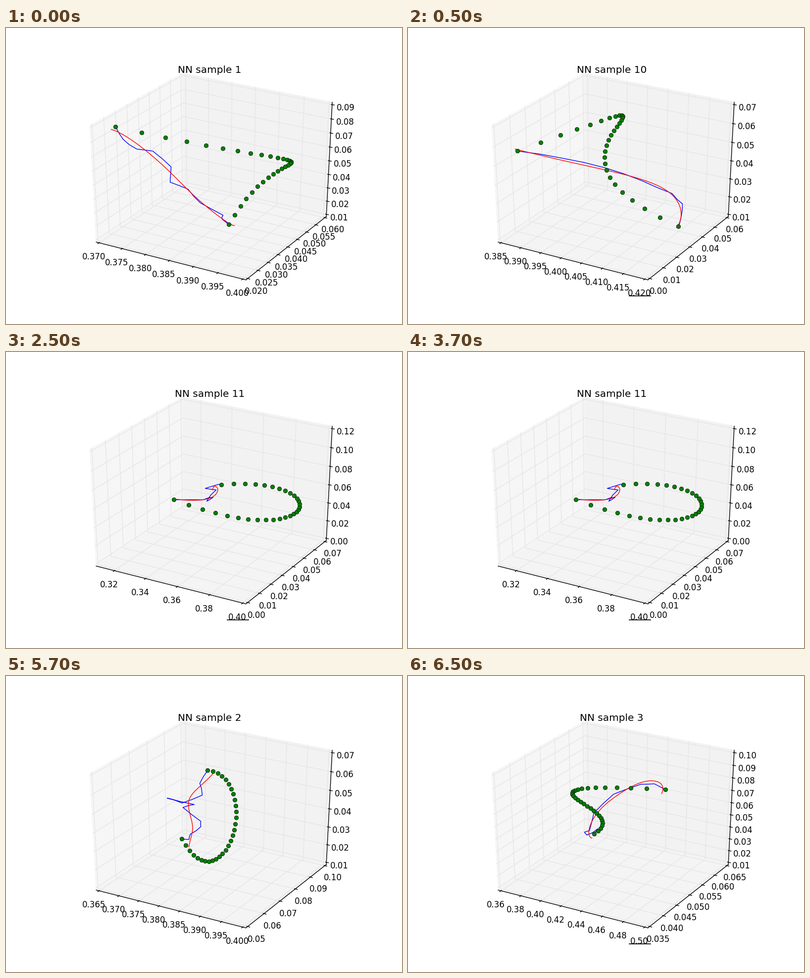
These frames come from a looping animation (800x600 px, 8 s). A matplotlib script:

```python
import numpy as np
import matplotlib.pyplot as plt
from matplotlib.animation import FuncAnimation

plt.rcParams["font.family"] = "DejaVu Sans"

INTERVAL = 500
LO, HI = -1 / 48, 1 + 1 / 48  # panes reach slightly past the axis limits
DOT_COUNT = 30

fig = plt.figure(figsize=(8, 6), dpi=100, facecolor="white")
ax = fig.add_axes([0, 0, 1, 1])


def project(x, y, z):
    """Unit-cube point to stage pixels (elevation 30, azimuth -60, distance 10)."""
    rel = np.array([x, y, z], float) - 0.5
    elev, azim = np.radians(30), np.radians(-60)
    ce, se, ca, sa = np.cos(elev), np.sin(elev), np.cos(azim), np.sin(azim)
    depth = 10 - rel @ [ce * ca, ce * sa, se]
    right = rel @ [-sa, ca, 0] / depth
    up = rel @ [-se * ca, -se * sa, ce] / depth
    return 100 + (right + 0.095) / 0.185 * 620, 540 - (up + 0.095) / 0.185 * 480


def spline(points, knots, samples):
    """Not-a-knot cubic through the points, one per knot."""
    def basis(t):
        bends = [np.maximum(t - k, 0) ** 3 for k in knots[2:-2]]
        return np.stack([t**0, t, t**2, t**3] + bends, axis=1)

    weights = np.linalg.solve(basis(knots), np.array(points, float))
    return basis(np.linspace(0, knots[-1], samples)) @ weights


def dot_path(points):
    """Key points sit at every fifth dot and at the last one."""
    knots = np.minimum(np.arange(len(points)) * 5.0, DOT_COUNT - 1)
    return spline(points, knots, DOT_COUNT)


def smooth_path(points):
    return spline(points, np.arange(len(points), dtype=float), 90) + 0.5


def rough_path(points, seed):
    """Polyline through the points with a slightly displaced middle in each leg."""
    keys = np.array(points, float)
    rng = np.random.default_rng(seed)
    path = np.empty((2 * len(keys) - 1, 2))
    path[::2] = keys
    path[1::2] = (keys[1:] + keys[:-1]) / 2 + rng.uniform(-1.5, 1.5, (len(keys) - 1, 2))
    return path + 0.5


def ticks(first, last, step, digits, low=None):
    """Pairs of (position along the axis, label)."""
    low = first if low is None else low
    count = round((last - first) / step) + 1
    return [((v - low) / (last - low), f"{v:.{digits}f}")
            for v in np.linspace(first, last, count)]


def stroke3d(points, color, **style):
    ax.plot(*zip(*[project(*p) for p in points]), color=color, lw=1, **style)


def draw_box(axes_ticks):
    panes = [
        ([(LO, LO, LO), (LO, HI, LO), (LO, HI, HI), (LO, LO, HI)], 0.965),
        ([(LO, HI, LO), (HI, HI, LO), (HI, HI, HI), (LO, HI, HI)], 0.95),
        ([(LO, LO, LO), (HI, LO, LO), (HI, HI, LO), (LO, HI, LO)], 0.956),
    ]
    for corners, gray in panes:
        ax.fill(*zip(*[project(*c) for c in corners]), fc=str(gray), ec=str(gray), lw=1)

    # per axis: edge point, grid path, outward tick direction, label offset
    layout = [
        (lambda u: (u, LO, LO), lambda u: [(u, LO, LO), (u, HI, LO), (u, HI, HI)],
         (0, -1, 0), (0, -0.064, -0.089)),
        (lambda u: (HI, u, LO), lambda u: [(HI, u, LO), (LO, u, LO), (LO, u, HI)],
         (1, 0, 0), (0.06, 0, -0.092)),
        (lambda u: (HI, HI, u), lambda u: [(HI, HI, u), (LO, HI, u), (LO, LO, u)],
         (1, 0, 0), (0.091, 0, 0)),
    ]
    for (_, grid, _, _), marks in zip(layout, axes_ticks):
        for u, _ in marks:
            stroke3d(grid(u), "0.9")
    for (edge, _, out, shift), marks in zip(layout, axes_ticks):
        stroke3d([edge(LO), edge(HI)], "black")
        for u, label in marks:
            at, out = np.array(edge(u)), np.array(out)
            stroke3d([at + out * 0.2 / 12, at - out * 0.1 / 12], "black",
                     solid_capstyle="butt")
            x, y = project(*(at + shift))
            ax.text(x, y + 6.1, label, size=12, ha="center", va="baseline")


schedule = []


def show(number, duration, axes_ticks, dots, smooth, rough, underline=False):
    sample = (number, axes_ticks, dot_path(dots), smooth_path(smooth),
              rough_path(rough, number), underline)
    schedule.extend([sample] * (duration // INTERVAL))


show(1, 500,
     [ticks(0.37, 0.4, 0.005, 3), ticks(0.02, 0.06, 0.005, 3), ticks(0.01, 0.09, 0.01, 2)],
     dots=[(221, 200), (438, 244), (549, 263), (576, 273), (549, 290), (497, 333),
           (450, 398)],
     smooth=[(212, 205), (265, 235), (325, 286), (379, 339), (432, 383), (461, 400)],
     rough=[(221, 200), (236, 225), (264, 245), (296, 249), (333, 281), (331, 312),
            (367, 326), (392, 354), (438, 379), (436, 387), (450, 398)])

show(10, 2000,
     [ticks(0.385, 0.42, 0.005, 3), ticks(0, 0.06, 0.01, 2), ticks(0.01, 0.07, 0.01, 2)],
     dots=[(221, 249), (390, 188), (434, 179), (416, 208), (397, 262), (433, 333),
           (546, 402)],
     smooth=[(216, 245), (370, 281), (470, 306), (530, 335), (551, 372), (542, 404)],
     rough=[(221, 249), (309, 263), (398, 283), (472, 309), (533, 335), (554, 356),
            (551, 384), (546, 402)],
     underline=True)

show(11, 2000,
     [ticks(0.32, 0.4, 0.02, 2, low=0.31), ticks(0, 0.07, 0.01, 2), ticks(0, 0.12, 0.02, 2)],
     dots=[(339, 299), (469, 336), (553, 338), (591, 319), (582, 291), (522, 270),
           (435, 269)],
     smooth=[(417, 279), (423, 272), (427, 281), (411, 296), (372, 300), (345, 298)],
     rough=[(339, 299), (398, 299), (418, 294), (405, 302), (424, 279), (402, 276),
            (428, 268), (435, 269)],
     underline=True)

show(2, 2000,
     [ticks(0.365, 0.4, 0.005, 3), ticks(0.05, 0.1, 0.01, 2), ticks(0.01, 0.07, 0.01, 2)],
     dots=[(407, 191), (450, 219), (465, 275), (454, 334), (424, 371), (387, 369),
           (355, 330)],
     smooth=[(418, 197), (383, 231), (368, 259), (375, 295), (375, 320), (369, 346)],
     rough=[(407, 191), (391, 217), (396, 241), (355, 257), (325, 247), (380, 260),
            (357, 266), (393, 294), (393, 305), (372, 320), (369, 331), (355, 330)])

show(3, 1500,
     [ticks(0.36, 0.5, 0.02, 2), ticks(0.035, 0.065, 0.005, 3), ticks(0.01, 0.1, 0.01, 2)],
     dots=[(520, 230), (379, 226), (333, 234), (343, 251), (375, 273), (393, 298),
           (376, 320)],
     smooth=[(512, 238), (508, 216), (480, 213), (440, 230), (390, 268), (366, 308),
             (371, 328)],
     rough=[(520, 230), (497, 218), (470, 219), (415, 239), (375, 277), (366, 313),
            (356, 316), (361, 322), (383, 309), (376, 320)],
     underline=True)


def draw(frame):
    number, axes_ticks, dots, smooth, rough, underline = schedule[frame]
    ax.clear()
    ax.set(xlim=(0, 800), ylim=(600, 0))
    ax.axis("off")
    draw_box(axes_ticks)
    ax.plot(*rough.T, color="blue", lw=1)
    ax.plot(*smooth.T, color="red", lw=1)
    ax.plot(*dots.T, "o", color=(0, 0.5, 0), ms=6, mec="black", mew=0.5)
    if underline:
        ax.plot([447, 490], [542.5, 542.5], color="black", lw=1.2)
    ax.text(411.5, 91.4, f"NN sample {number}", size=14.4, ha="center", va="baseline")
    return []


anim = FuncAnimation(fig, draw, frames=len(schedule), init_func=lambda: [],
                     interval=INTERVAL, repeat=True, repeat_delay=0)
plt.show()
```
